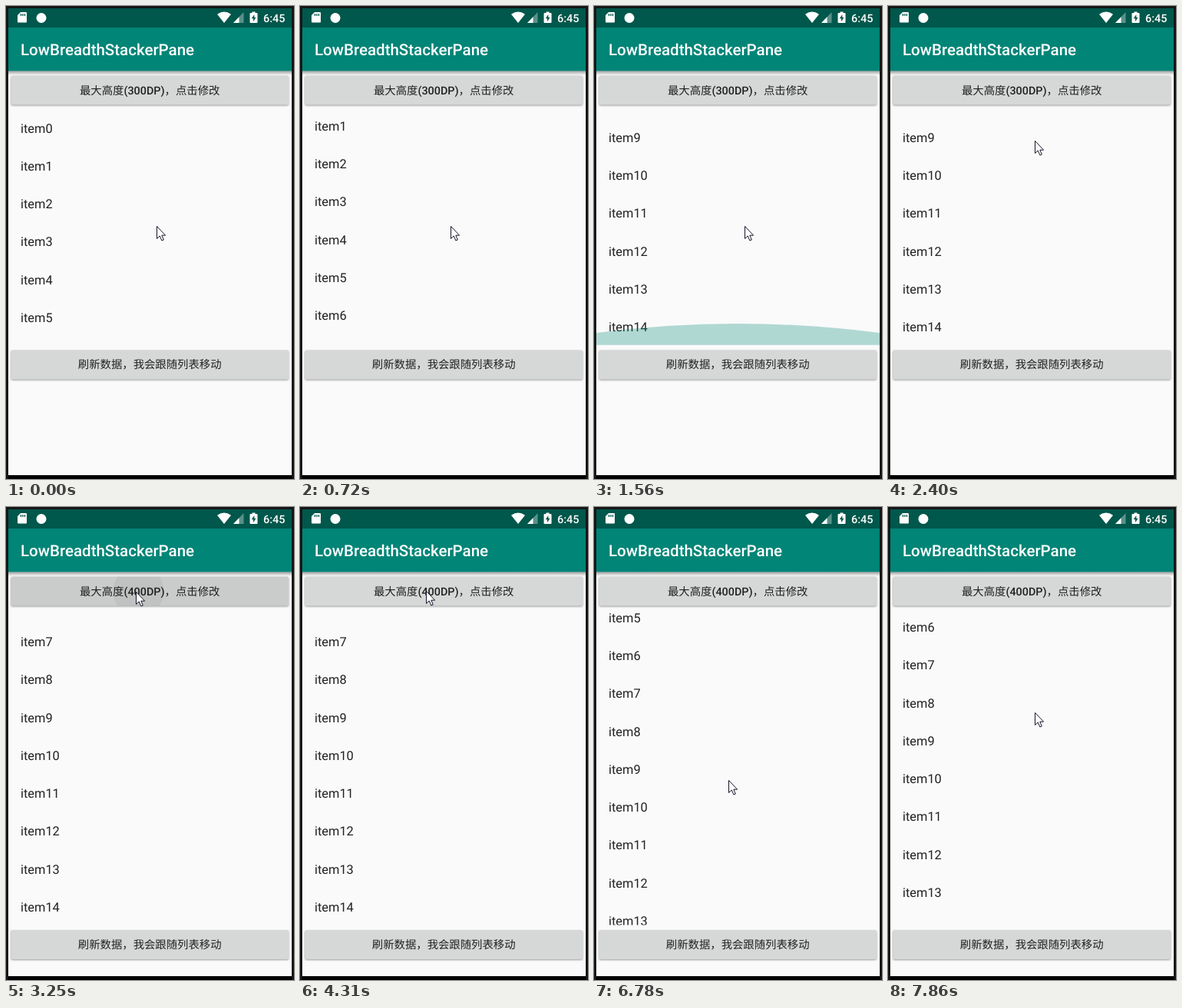
Animation, 375 px wide and 615 px high, one loop 8 s. Source, as an HTML page:

```html
<!DOCTYPE html>
<html lang="zh">
<head>
<meta charset="utf-8">
<style>
  html, body { margin: 0; width: 100%; height: 100%; overflow: hidden; background: #161616; }
  svg { display: block; font-family: Roboto, "Noto Sans CJK SC", "Noto Sans CJK", sans-serif; text-rendering: geometricPrecision; }
  .button > rect { fill: #d6d7d7; filter: drop-shadow(0 1px 1px rgba(0, 0, 0, .38)); }
  .button text { font-size: 14.36px; text-anchor: middle; fill: #212121; }
  .latin, .title, .clock { font-weight: 500; }
  #items { font-size: 16.4px; fill: #212121; }
  .title { font-size: 20.5px; fill: #fff; }
  .clock { font-size: 14.4px; fill: #fff; }
</style>
</head>
<body>
<svg width="375" height="615" viewBox="0 0 375 615">
  <defs>
    <linearGradient id="shade" x2="0" y2="1">
      <stop stop-opacity=".36"/>
      <stop offset="1" stop-opacity="0"/>
    </linearGradient>
    <clipPath id="listClip"><rect id="view" x="3" y="133" width="369"/></clipPath>
    <clipPath id="buttonClip"><rect x="6.5" y="90.5" width="361.5" height="38" rx="2"/></clipPath>
  </defs>

  <rect x="3" y="3" width="369" height="607" fill="#fafafa"/>
  <rect x="3" y="610" width="369" height="5"/>

  <g clip-path="url(#listClip)">
    <g id="items"></g>
    <path id="glow" fill="#008577"/>
  </g>

  <rect x="3" y="3" width="369" height="25" fill="#00574b"/>
  <rect x="3" y="28" width="369" height="56.5" fill="#008577"/>
  <rect x="3" y="84.5" width="369" height="5.5" fill="url(#shade)"/>
  <text class="title" x="19" y="64">LowBreadthStackerPane</text>

  <!-- status icons -->
  <g fill="#fff" transform="translate(0 -.5)">
    <path d="M19 8.5h7q1 0 1 1v11.5q0 1-1 1h-10q-1 0-1-1v-8.5z"/>
    <path d="M19.5 10.5v3M22 10.5v3M24.5 10.5v3" stroke="#00574b" stroke-width="1.3"/>
    <circle cx="46" cy="16" r="6.5"/>
    <path d="M284 22.5L275 11.3Q284 4.5 293 11.3z"/>
    <path d="M296 22.5h13.5v-14z" opacity=".35"/>
    <path d="M296 22.5h7.5v-7.8z"/>
    <path d="M320.5 8h4v1.5h2q1 0 1 1v11q0 1-1 1h-8q-1 0-1-1v-11q0-1 1-1h2z"/>
    <path d="M323.3 11.5l-3.6 5.3h2.3v3.9l3.5-5.4h-2.2z" fill="#00574b"/>
  </g>
  <text class="clock" x="335" y="20.6">6:45</text>

  <g class="button">
    <rect x="6.5" y="90.5" width="361.5" height="38" rx="2"/>
    <g clip-path="url(#buttonClip)">
      <rect id="press" x="6" y="90" width="363" height="39"/>
      <circle id="ripple" cx="172.5" cy="109.5" opacity=".05"/>
    </g>
    <text x="187.2" y="114.7">最大高度<tspan class="latin">(<tspan id="limit">300</tspan>DP)</tspan>，点击修改</text>
  </g>
  <g class="button" id="refresh">
    <rect x="6.5" y="447.5" width="361.5" height="38" rx="2"/>
    <text x="187.2" y="471.2">刷新数据，我会跟随列表移动</text>
  </g>

  <path id="cursor" d="M.5.5v16l3.7-3.5 2.7 6 2.4-1-2.5-5.8h4.8z" fill="#fff" stroke="#15152a"/>
</svg>

<script>
const LOOP = 8000, TICK = 149, PHASE = 110;
const DP = 1.026, ROW = 48 * DP, COUNT = 15;
const $ = id => document.getElementById(id);
const set = (id, attrs) => {
  for (const key in attrs) $(id).setAttribute(key, attrs[key]);
};

// 0 before start, 1 after end, linear between
const ramp = (t, start, end) => Math.min(1, Math.max(0, (t - start) / (end - start)));
const pulse = (t, start, peak, end) => ramp(t, start, peak) * (1 - ramp(t, peak, end));

// Pointer moves: start time, end time, x, y
const moves = [
  [2150, 2400, 190, 144], [2400, 2640, 169, 110],
  [4100, 4400, 161, 109], [4400, 4850, 187, 116], [4850, 5170, 184, 117],
  [5400, 5760, 175, 355], [7411, 7850, 191, 267]
];

function pointer(t) {
  let x = 196, y = 286;
  for (const [start, end, toX, toY] of moves) {
    const p = ramp(t, start, end);
    x += (toX - x) * p;
    y += (toY - y) * p;
  }
  return [Math.round(x), Math.round(y)];
}

for (let i = 0; i < COUNT; i++) {
  const row = document.createElementNS("http://www.w3.org/2000/svg", "text");
  row.setAttribute("x", 19);
  row.setAttribute("y", 140 + ROW * (i + .5));
  row.textContent = "item" + i;
  $("items").append(row);
}

function draw(now) {
  // The screen refreshes in coarse steps.
  const t = PHASE + TICK * Math.floor((now % LOOP - PHASE) / TICK);
  const limit = t < 3230 ? 300 : 400;
  const bottom = COUNT * ROW - limit * DP;
  const scroll = bottom * ramp(t, 126, 1300) ** 3 - 67.4 * ramp(t, 6400, 6660) + 37 * ramp(t, 7411, 7850);
  const glow = pulse(t, 1150, 1450, 2260);
  const press = pulse(t, 2960, 3239, 3450);

  $("limit").textContent = limit;
  set("view", { height: limit * DP });
  set("refresh", { transform: `translate(0 ${(limit - 300) * DP})` });
  set("items", { transform: `translate(0 ${-scroll})` });

  const edge = 441 - 16 * glow, crown = edge - 24 * glow;
  set("glow", { d: `M3 ${edge}Q187.5 ${crown} 372 ${edge}V441H3z`, opacity: .3 * glow });
  set("press", { opacity: .055 * press });
  set("ripple", { r: 33 * press });
  set("cursor", { transform: `translate(${pointer(t)})` });
  requestAnimationFrame(draw);
}
draw(0);
</script>
</body>
</html>
```
